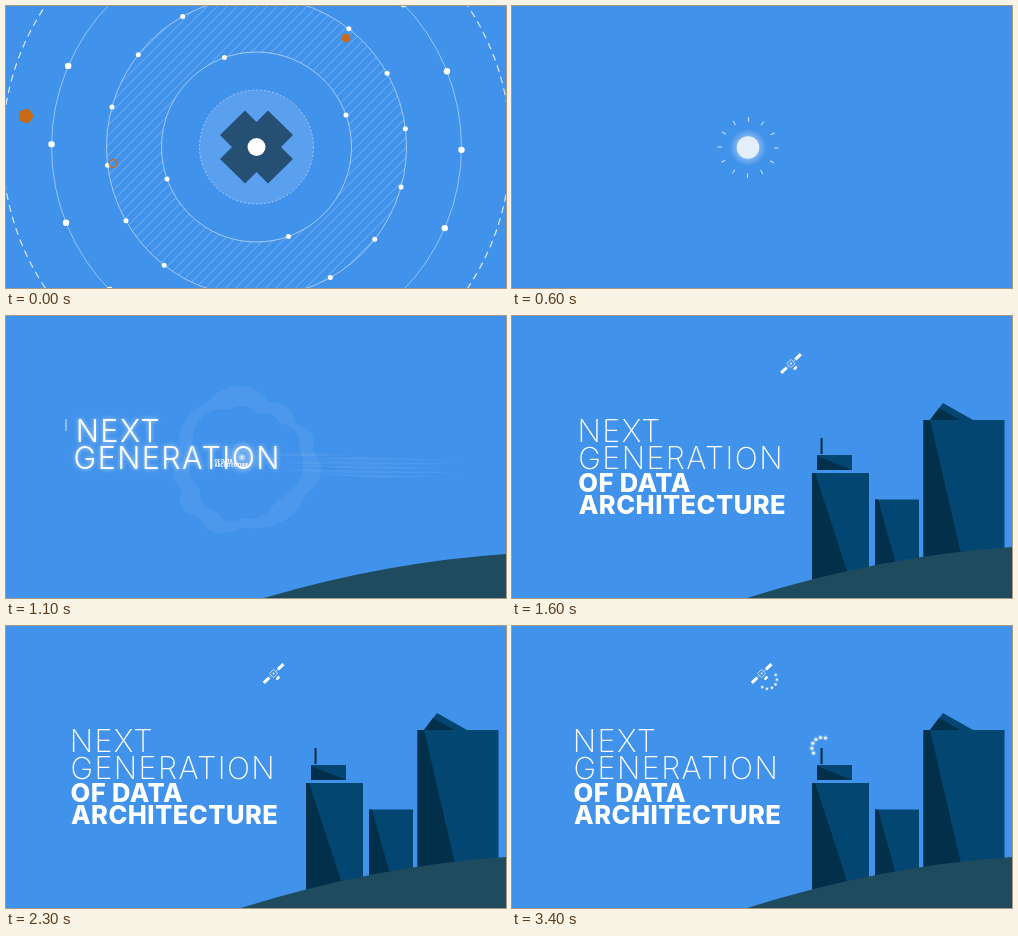
Recreate the animation shown at these times as an HTML page with a canvas. Size 500 by 282 pixels, loop 3.5 s.

```html
<!DOCTYPE html>
<html lang="en">
<head>
<meta charset="utf-8">
<title>Next generation of data architecture</title>
<style>
html, body { margin: 0; width: 100%; height: 100%; overflow: hidden; background: #4192eb; }
canvas { display: block; width: 500px; height: 282px; }
</style>
</head>
<body>
<canvas id="stage" width="500" height="282"></canvas>
<script>
const ctx = document.getElementById('stage').getContext('2d');
const LOOP = 3500, STEP = 100, TAU = Math.PI * 2;
const BLUE = '#4192eb', NAVY = '#034672', SHADE = '#022f4a', HILL = '#1f4b5f';
const ORANGE = '#c96a17';
const FONT = 'Inter, "Open Sans", sans-serif';
const O = { x: 236, y: 141.5 };

const clamp = v => Math.max(0, Math.min(1, v));
const part = (t, a, b) => clamp((t - a) / (b - a));
const mix = (a, b, k) => a + (b - a) * k;
const easeIn = k => k * k * k;
const easeOut = k => 1 - (1 - k) ** 3;
const smooth = k => k * k * (3 - 2 * k);
const white = a => `rgba(255,255,255,${a})`;

function layer(draw) {
  ctx.save();
  draw();
  ctx.restore();
}

function poly(color, ...pts) {
  ctx.beginPath();
  for (let i = 0; i < pts.length; i += 2) ctx.lineTo(pts[i], pts[i + 1]);
  ctx.closePath();
  ctx.fillStyle = color;
  ctx.fill();
}

function rect(color, x, y, x2, y2) {
  ctx.fillStyle = color;
  ctx.fillRect(x, y, x2 - x, y2 - y);
}

function disc(x, y, r, color) {
  ctx.beginPath();
  ctx.arc(x, y, r, 0, TAU);
  ctx.fillStyle = color;
  ctx.fill();
}

function ring(r, color, width = 1, dash = []) {
  ctx.beginPath();
  ctx.arc(0, 0, r, 0, TAU);
  ctx.setLineDash(dash);
  ctx.strokeStyle = color;
  ctx.lineWidth = width;
  ctx.stroke();
  ctx.setLineDash([]);
}

function beads(r, count, start, size) {
  for (let i = 0; i < count; i++) {
    const a = start * Math.PI / 180 + i * TAU / count;
    disc(r * Math.cos(a), r * Math.sin(a), size, '#fff');
  }
}

function pentagon(x, y, r, turn) {
  const pts = [];
  for (let i = 0; i < 5; i++) {
    const a = turn + i * TAU / 5;
    pts.push(x + r * Math.cos(a), y + r * Math.sin(a));
  }
  poly(ORANGE, ...pts);
}

function hatch() {
  ctx.beginPath();
  ctx.arc(0, 0, 150, 0, TAU);
  ctx.arc(0, 0, 95, 0, TAU, true);
  ctx.clip();
  ctx.beginPath();
  for (let c = -300; c < 300; c += 10) {
    ctx.moveTo(c - 150, 150);
    ctx.lineTo(c + 150, -150);
  }
  ctx.strokeStyle = white(0.3);
  ctx.lineWidth = 1;
  ctx.stroke();
}

function orbits(t) {
  const k = part(t, 0, 480);
  if (k >= 1) return;
  const s = 1 - easeIn(k) * 0.96;
  layer(() => {
    ctx.translate(mix(250.5, O.x, smooth(k)), 141);
    ctx.scale(s, s);
    ctx.globalAlpha = 1 - part(t, 300, 480);
    ctx.rotate(k * 0.4);
    layer(hatch);
    ring(254, white(0.8), 1.2, [7, 5]);
    ring(205, white(0.45));
    ring(150, white(0.5));
    ring(95, white(0.5));
    disc(0, 0, 57, white(0.13));
    ring(57, white(0.45), 1, [2, 2]);
    beads(205, 16, 0.8, 3.2);
    beads(150, 16, -52, 2.5);
    beads(95, 4, -19.7, 2.5);
    pentagon(89.5, -109, 5, 0.4);
    pentagon(-230.5, -31, 8, 0);
    layer(() => {
      ctx.translate(-143.5, 16.5);
      ring(4, ORANGE, 1.3);
    });
    ctx.rotate(-k * 0.4);
    poly('#254f73', -11.5, -36.5, 0, -25, 11.5, -36.5, 36.5, -12, 24.5, 0, 36.5, 12,
      11.5, 36.5, 0, 25, -11.5, 36.5, -36.5, 12, -24.5, 0, -36.5, -12);
    disc(0, 0, 9, '#fff');
  });
}

function glow(x, y, r, alpha) {
  const g = ctx.createRadialGradient(x, y, 0, x, y, r);
  g.addColorStop(0, white(alpha));
  g.addColorStop(0.55, white(alpha * 0.5));
  g.addColorStop(1, white(0));
  disc(x, y, r, g);
}

function sun(t) {
  const on = part(t, 300, 500), off = part(t, 700, 900);
  if (!on || off >= 1) return;
  const r = 11.3 * easeOut(on) * (1 - off * 0.6);
  layer(() => {
    ctx.globalAlpha = 1 - off;
    glow(O.x, O.y, r * 1.65, 0.7);
    disc(O.x, O.y, r, '#e5effc');
    const inner = 25.8 + part(t, 600, 900) * 60 - (1 - part(t, 400, 600)) * 12;
    ctx.translate(O.x, O.y);
    ctx.rotate(0.015);
    ctx.strokeStyle = white(part(t, 400, 600) * 0.75);
    for (let i = 0; i < 12; i++) {
      ctx.rotate(TAU / 12);
      ctx.beginPath();
      ctx.moveTo(inner, 0);
      ctx.lineTo(inner + 4.6, 0);
      ctx.stroke();
    }
  });
}

// Closed wavy outline, rounder bumps outside and calmer inside.
function puff(r, bump, phase) {
  for (let i = 0; i <= 140; i++) {
    const a = i / 140 * TAU;
    const d = r * (1 + bump * Math.abs(Math.sin(a * 4.5 + Math.sin(a * 2 + phase)))
      + 0.06 * Math.sin(a * 3 + phase));
    ctx.lineTo(d * Math.cos(a), d * Math.sin(a));
  }
  ctx.closePath();
}

function blast(t) {
  const k = part(t, 650, 1350);
  if (!k || k >= 1) return;
  const r = 78 * easeOut(k), fade = Math.min(1, (1 - k) * 2.8);
  layer(() => {
    ctx.translate(238, 146);
    ctx.fillStyle = white(0.06 * fade);
    ctx.beginPath();
    puff(r * 0.9, 0.1, 1);
    puff(r * 0.72, 0.08, 2.2);
    ctx.fill('evenodd');
    const reach = easeOut(part(t, 650, 1100));
    for (let i = 0; i < 6; i++) {
      const y = -8 + i * 4.4, from = 20 + (i * 37) % 70, len = 90 + (i * 53) % 110;
      poly(white(0.06 * fade), from * reach, y * 0.8, (from + len * 0.4) * reach, y - 1.6,
        (from + len) * reach, y + 1, (from + len * 0.5) * reach, y + 2.2);
    }
  });
}

function words(text, x, y, size, weight, spacing) {
  ctx.font = `${weight} ${size}px ${FONT}`;
  ctx.letterSpacing = spacing + 'px';
  ctx.fillText(text, x, y);
}

function zoom(s) {
  ctx.translate(O.x, O.y);
  ctx.scale(s, s);
  ctx.translate(-O.x, -O.y);
}

// Grows past full size, then settles.
function pop(t, a, b, c, small, big) {
  return t < b ? mix(small, big, smooth(part(t, a, b))) : mix(big, 1, easeOut(part(t, b, c)));
}

function title(t) {
  const x = 67 - (t - 1600) * 0.0026;
  ctx.fillStyle = '#fff';
  if (t >= 700) layer(() => {
    zoom(pop(t, 650, 900, 1100, 0.05, 1.25));
    const heat = 1 - part(t, 1000, 1500);
    if (heat > 0) {
      ctx.shadowColor = white(0.8 * heat);
      ctx.shadowBlur = 5 * heat;
    }
    const weight = heat > 0.3 ? 270 : 200;
    words('NEXT', x - 1.5 + 3 * (1 - part(t, 1100, 1300)), 125.6, 30.5, weight, 1.4);
    words('GENERATION', x - 0.7, 153.2, 30.5, weight, 1.4);
  });
  if (t >= 1000) layer(() => {
    zoom(pop(t, 1050, 1300, 1500, 0.06, 1.06));
    words('OF DATA', x - 0.7, 175.5, 25.5, 800, 0.45);
    words('ARCHITECTURE', x - 0.2, 198.4, 25.5, 800, 0.45);
  });
  if (t >= 1000 && t < 1300) rect(white(0.75), 59.5, 103, 60.5, 115);
  const spark = part(t, 700, 900) * (1 - part(t, 1050, 1300));
  if (spark > 0) {
    glow(O.x, O.y, 18, 0.35 * spark);
    glow(O.x, O.y, 4, spark);
  }
}

function tower(t, start, draw) {
  const k = part(t, start, start + 350);
  if (!k) return;
  layer(() => {
    ctx.translate(0, 185 * (1 - easeOut(k)));
    draw();
  });
}

function city(t) {
  tower(t, 1200, () => {
    rect(SHADE, 308.5, 122, 310.6, 138);
    rect(NAVY, 305, 139, 340, 154);
    poly(SHADE, 305, 140, 340, 154, 305, 154);
    rect(NAVY, 300, 157, 357, 290);
    poly(SHADE, 300, 157, 303, 157, 338, 264, 300, 290);
  });
  tower(t, 1250, () => {
    rect(NAVY, 363, 183.5, 407, 290);
    poly(SHADE, 363, 183.5, 366, 183.5, 385, 252, 363, 290);
  });
  tower(t, 1150, () => {
    poly(NAVY, 418, 104, 431, 87, 461, 104);
    poly(SHADE, 418, 104, 427, 92, 448, 104);
    rect(NAVY, 411.5, 104, 492.5, 300);
    poly(SHADE, 411.5, 104, 418, 104, 449.5, 240, 411.5, 290);
  });
  const rise = easeOut(part(t, 800, 1400));
  if (!rise) return;
  layer(() => {
    ctx.translate(0, 56 * (1 - rise));
    ctx.beginPath();
    ctx.moveTo(235, 282);
    ctx.quadraticCurveTo(368, 240, 500, 231);
    ctx.lineTo(500, 290);
    ctx.lineTo(235, 290);
    ctx.fillStyle = HILL;
    ctx.fill();
  });
}

function signal(x, y, r, from, to, size, alpha) {
  for (let i = 0; i < 6; i++) {
    const a = mix(from, to, i / 5) * Math.PI / 180;
    const px = x + r * Math.cos(a), py = y + r * Math.sin(a);
    glow(px, py, size * 2.2, 0.5 * alpha);
    disc(px, py, size, white(0.85 * alpha));
  }
}

function satellite(t) {
  if (t < 1300) return;
  const x = 279 - (t - 1600) * 0.0163;
  const y = 47.5 - 60 * (1 - easeOut(part(t, 1200, 1500)));
  layer(() => {
    ctx.translate(x, y);
    ctx.rotate(-0.76);
    for (const side of [-1, 1]) {
      rect('#fff', side * 9.8 - 3.8, -1.5, side * 9.8 + 3.8, 1.5);
      rect(white(0.8), side * 4.5 - 1.5, -0.3, side * 4.5 + 1.5, 0.3);
    }
    ctx.strokeStyle = white(0.9);
    ctx.lineWidth = 0.7;
    ctx.strokeRect(-2.9, -2.9, 5.8, 5.8);
    rect('#fff', -0.8, -0.8, 0.8, 0.8);
    ctx.beginPath();
    ctx.ellipse(0, 6.3, 2.3, 1.4, 0, 0, TAU);
    ctx.fillStyle = '#fff';
    ctx.fill();
  });
  const on = part(t, 2400, 2700);
  if (!on) return;
  const beat = Math.cos((t - 2800) / 1200 * TAU);
  signal(x + 6, y + 6, (10 + 0.7 * beat) * on, 125, -30, 1.1, on);
  signal(310, 121.5, (10.6 + 0.5 * beat) * on, 147, 290, 1.5, on);
}

const begin = performance.now();

function frame() {
  const now = performance.now() - begin;
  const t = Math.floor(now % LOOP / STEP) * STEP;
  rect(BLUE, 0, 0, 500, 282);
  orbits(t);
  blast(t);
  sun(t);
  city(t);
  title(t);
  satellite(t);
  requestAnimationFrame(frame);
}

frame();
</script>
</body>
</html>
```
